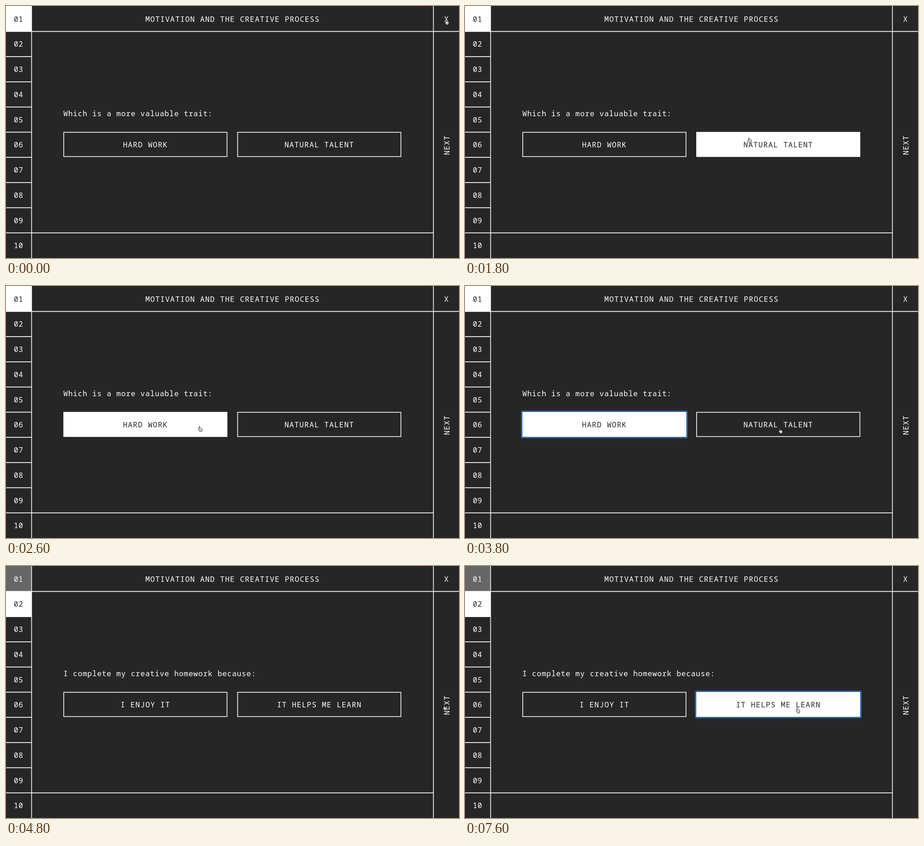
An HTML page for the animation above (8 s loop, 1003x558 px).

```html
<!DOCTYPE html>
<html lang="en">
<head>
<meta charset="utf-8">
<title>Questionnaire</title>
<style>
  html, body { margin: 0; width: 100%; height: 100%; overflow: hidden; background: #262626; }
  svg { display: block; width: 1003px; height: 558px; }
  text { font: 16.5px "Noto Sans Mono", "DejaVu Sans Mono", monospace; letter-spacing: 1.13px; fill: #fff; white-space: pre; }
  .mid { text-anchor: middle; }
  .small { letter-spacing: .77px; }
  .dark { fill: #262626; }
  .line { fill: none; stroke: #fff; stroke-width: 1.6; }
  .ring { fill: none; stroke: #3567a3; stroke-width: 3; }
</style>
</head>
<body>
<svg id="stage" viewBox="0 0 1003 558">
  <g id="cells"></g>
  <path id="grid" class="line"/>
  <g id="numbers"></g>
  <text class="mid" x="501.5" y="34.5">MOTIVATION AND THE CREATIVE PROCESS</text>
  <text class="mid" x="975.4" y="34.5">X</text>
  <text transform="translate(982 330) rotate(-90)">NEXT</text>
  <text id="question" class="small" x="127" y="244.3"></text>
  <g id="answers"></g>
  <g id="hand" stroke="#111" stroke-width=".9" stroke-linejoin="round">
    <path fill="#fff" d="M2.6 6.8V1.4Q2.6.5 3.4.5Q4.2.5 4.2 1.4V4.4Q5.3 3.9 5.8 4.7Q6.8 4.2 7.4 5Q8.3 4.6 9.4 5.5Q9.8 8 8.6 10.2V11.6H3.8V10.5L.7 7.2Q.5 5.9 1.6 6.1Z"/>
    <path stroke-width=".6" d="M4.6 7.3V9.6M6 7.3V9.6M7.4 7.3V9.6"/>
  </g>
  <path id="arrow" fill="#111" stroke="#fff" stroke-width=".9" d="M.8.8V10.3L2.9 8.4L4.4 12L6.1 11.2L4.6 7.9H7.7Z"/>
</svg>
<script>
const LOOP = 8000, ROW = 55.75;
const el = id => document.getElementById(id);

const screens = [
  { question: "Which is a more valuable trait:", answers: ["HARD WORK", "NATURAL TALENT"] },
  { question: "I complete my creative homework because:", answers: ["I ENJOY IT", "IT HELPS ME LEARN"] }
];

// The pointer holds each place until the next one: time, x, y, shape
const pointer = [
  [0, 971, 30, "hand"], [400, 946, 54.5, "hand"], [600, 856, 139, "arrow"],
  [800, 853, 143, "arrow"], [1000, 843, 148, "arrow"], [1200, 702, 197, "arrow"],
  [1400, 683, 206, "arrow"], [1600, 631, 286, "hand"], [1800, 625, 291.5, "hand"],
  [2400, 471, 308, "hand"], [2600, 425, 310.5, "hand"], [3800, 693.5, 315, "hand"],
  [4000, 906, 302, "arrow"], [4200, 949, 305, "hand"], [4400, 966.5, 308, "hand"],
  [6800, 923, 316, "arrow"], [7000, 814, 316, "hand"], [7200, 738, 315.5, "hand"],
  [7400, 732, 314, "hand"]
];

const within = (t, from, to) => t >= from && t < to;

function answer(label, x, filled, focused) {
  return `<rect class="line" x="${x + .8}" y="279.6" width="361.6" height="53.8"
      style="${filled ? "fill:#fff" : ""}"/>
    ${focused ? `<rect class="ring" x="${x - 1.4}" y="277.4" width="366" height="58.2" rx="1.5"/>` : ""}
    <text class="mid ${filled ? "dark" : ""}" x="${x + 181.7}" y="313.2">${label}</text>`;
}

function drawScreen(page, filled, focused) {
  const { question, answers } = screens[page];
  el("question").textContent = question;
  el("answers").innerHTML = answers.map((label, i) =>
    answer(label, 127 + 385 * i, i === filled, i === focused)).join("");

  const cell = (row, color) =>
    `<rect y="${row * ROW}" width="56.5" height="56.5" fill="${color}"/>`;
  el("cells").innerHTML = (page ? cell(0, "#666") : "") + cell(page, "#fff");

  el("numbers").innerHTML = Array.from({ length: 10 }, (_, i) =>
    `<text class="mid small ${i === page ? "dark" : ""}" x="27.8" y="${34.5 + i * ROW}">${
      String(i + 1).padStart(2, "0")}</text>`).join("");
}

function drawGrid() {
  let d = "M56.6 0V558M946.4 0V558M57 56.4H1003";
  for (let i = 0; i < 9; i++) d += `M0 ${56.4 + i * ROW}H${i === 8 ? 946 : 57}`;
  el("grid").setAttribute("d", d);
}

let lastState = "";

function render(t) {
  const page = t < 4800 ? 0 : 1;
  const filled = within(t, 1800, 2400) || t >= 7600 ? 1 : within(t, 2600, 4800) ? 0 : -1;
  const focused = within(t, 3000, 4600) ? 0 : t >= 7600 ? 1 : -1;

  const state = [page, filled, focused].join();
  if (state !== lastState) drawScreen(page, filled, focused);
  lastState = state;

  const [, x, y, shape] = pointer.findLast(step => step[0] <= t);
  for (const id of ["hand", "arrow"]) {
    el(id).style.display = id === shape ? "" : "none";
    el(id).setAttribute("transform", `translate(${x} ${y})`);
  }
}

const start = performance.now();
function tick() {
  render((performance.now() - start) % LOOP);
  requestAnimationFrame(tick);
}
drawGrid();
tick();
</script>
</body>
</html>
```
